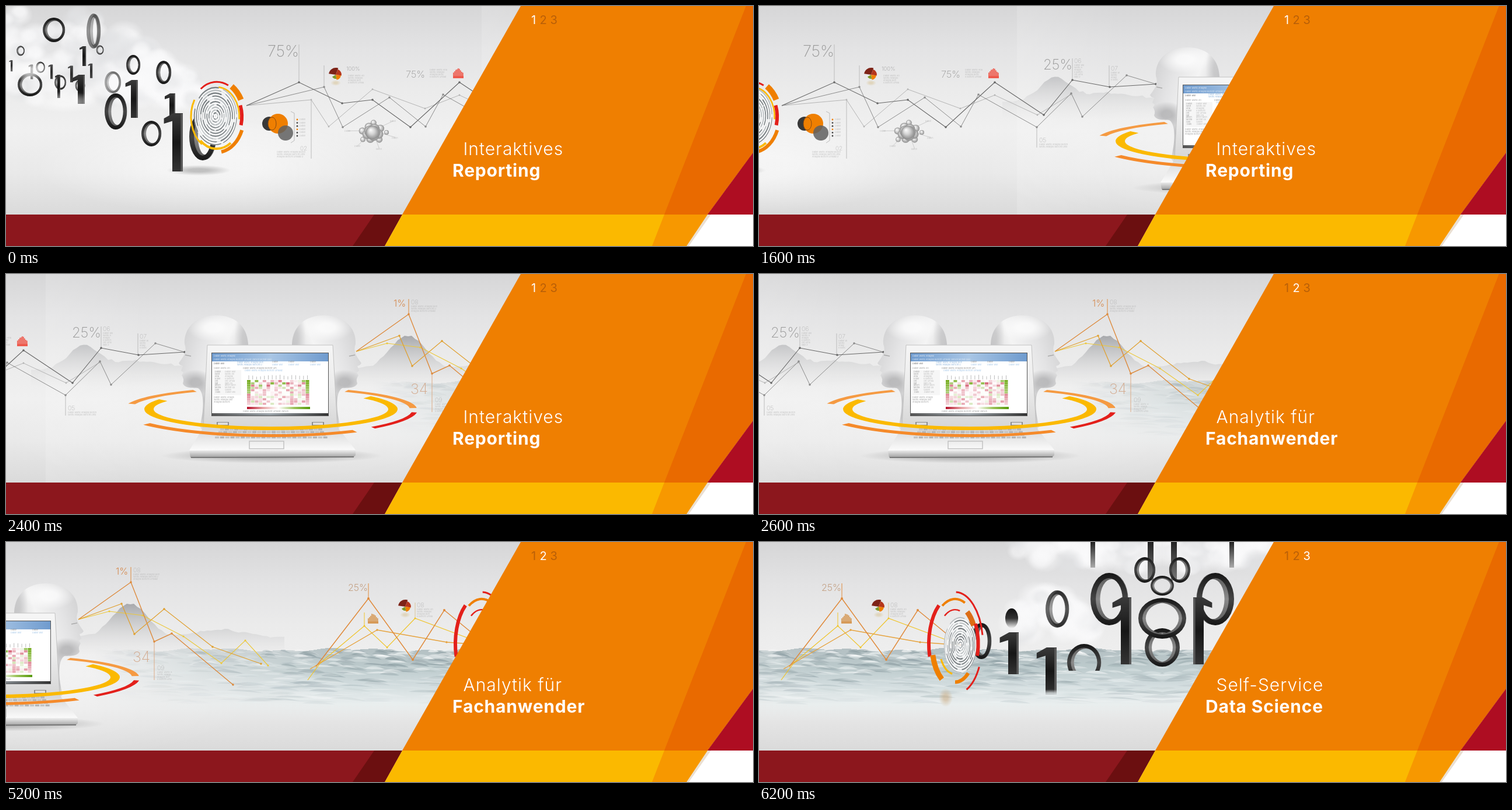
Animation, 1280 px wide and 412 px high, one loop 8200 ms. Source, as an HTML page with a canvas:

```html
<!DOCTYPE html>
<html lang="de">
<head>
<meta charset="utf-8">
<style>
html, body { margin: 0; width: 100%; height: 100%; overflow: hidden; background: #fff; }
canvas, svg { position: absolute; left: 0; top: 0; }
text { font-family: Inter, Lato, sans-serif; fill: #fff; }
.thin { font-size: 30px; font-weight: 300; letter-spacing: 1px; }
.bold { font-size: 30px; font-weight: 700; letter-spacing: .8px; }
.num { font-size: 20px; }
</style>
</head>
<body>
<canvas id="stage" width="1280" height="358"></canvas>
<svg width="1280" height="412">
  <path fill="#8c171d" d="M0 358H679L649 412H0Z"/>
  <path fill="#6b0f10" d="M631 358H679L649 412H594Z"/>
  <path fill="#ef7f01" d="M882 0H1280V252L1202 358H679Z"/>
  <path fill="#e96a00" d="M1268 0H1280V252L1202 358H1128Z"/>
  <path fill="#ae0d22" d="M1280 252V358H1202Z"/>
  <path fill="#eadfd2" d="M1202 358H1208L1170 412H1166Z"/>
  <path fill="#fbb900" d="M679 358H1202L1166 412H649Z"/>
  <path fill="#f79800" d="M1128 358H1202L1166 412H1107Z"/>
  <text class="num" x="900" y="31">1</text>
  <text class="num" x="914.5" y="31">2</text>
  <text class="num" x="932.5" y="31">3</text>
  <text class="thin" id="line1" x="783.5" y="256"></text>
  <text class="bold" id="line2" x="765" y="293"></text>
</svg>
<script>
const WIDTH = 2582, H = 358, MIRROR = 2393;
const world = document.createElement('canvas');
world.width = WIDTH; world.height = H;
const g = world.getContext('2d');
const ORANGE = '#ef7f01', YELLOW = '#fbb900', RED = '#e3201b', PALE = '#b4b4b4';

let seed = 7;
const rnd = () => (seed = seed * 16807 % 2147483647) / 2147483647;
const range = (a, b) => a + (b - a) * rnd();
const times = (n, fn) => { for (let i = 0; i < n; i++) fn(i); };
const bump = (x, mid, w) => Math.exp(-(((x - mid) / w) ** 2));

function at(x, y, sx, sy, draw) {
  g.save(); g.translate(x, y); g.scale(sx, sy); draw(); g.restore();
}
function grad(x0, y0, x1, y1, ...stops) {
  const l = g.createLinearGradient(x0, y0, x1, y1);
  stops.forEach((c, i) => l.addColorStop(i / (stops.length - 1), c));
  return l;
}
const down = (y0, y1, ...stops) => grad(0, y0, 0, y1, ...stops);
function rect(x, y, w, h, fill) { g.fillStyle = fill; g.fillRect(x, y, w, h); }
function poly(points, fill) {
  g.beginPath();
  points.forEach(p => g.lineTo(...p));
  g.fillStyle = fill; g.fill();
}
function line(points, color, w = 1, dots = 0) {
  g.beginPath();
  points.forEach(p => g.lineTo(...p));
  g.strokeStyle = color; g.lineWidth = w; g.stroke();
  if (dots) points.slice(1).forEach(p => disc(...p, dots, color));
}
function disc(x, y, r, fill) {
  g.beginPath(); g.arc(x, y, r, 0, 7); g.fillStyle = fill; g.fill();
}
function arc(x, y, rx, ry, from, to, w, color) {
  g.beginPath();
  g.ellipse(x, y, rx, ry, 0, from * Math.PI / 180, to * Math.PI / 180);
  g.strokeStyle = color; g.lineWidth = w; g.stroke();
}
// Elliptic band, dx wide at its sides and dy high at top and bottom
function band(x, y, rx, ry, dx, dy, from, to, fill) {
  const a = from * Math.PI / 180, b = to * Math.PI / 180;
  g.beginPath();
  g.ellipse(x, y, rx, ry, 0, a, b);
  g.ellipse(x, y, rx - dx, ry - dy, 0, b, a, true);
  g.fillStyle = fill; g.fill();
}
function soft(x, y, rx, ry, rgb, a, core = .3) {
  at(x, y, rx, ry, () => {
    const f = g.createRadialGradient(0, 0, 0, 0, 0, 1);
    f.addColorStop(core, `rgba(${rgb},${a})`);
    f.addColorStop(1, `rgba(${rgb},0)`);
    disc(0, 0, 1, f);
  });
}
function clouds(n, x0, x1, top, bottom) {
  times(n, () => {
    const x = range(x0, x1), t = top(x), r = range(12, 30);
    const y = t + r * .7 + Math.max(0, bottom - t - r) * rnd();
    soft(x, y, r * 1.2, r, rnd() < .25 ? '226,227,229' : '250,250,251', .55, .5);
  });
}
function label(s, x, y, size, color = '#999', weight = 200) {
  g.font = `${weight} ${size}px Inter, sans-serif`;
  g.fillStyle = color; g.fillText(s, x, y);
}
function tiny(x, y, rows, chars, color = PALE) {
  const words = 'Daten Werte Analyse Bericht Umsatz Zahlen Monat Quelle ';
  times(rows, i => label(words.repeat(2).substr(i * 6, chars - i % 3), x, y + i * 3.9, 3.8, color, 300));
}
function note(s, x, y, rows, chars) {
  label(s, x, y, 10.5, PALE);
  tiny(x, y + 5, rows, chars);
}
const upright = (x, y0, y1, color = '#bbb') => line([[x, y0], [x, y1]], color);

function zero(x, y, rx, ry, a = 1) {
  const w = ry * .27;
  g.globalAlpha = a;
  band(x + w * .35, y, rx - w * .3, ry - 1, w * .7, w * .8, 0, 360, down(y - ry, y + ry, '#555', '#8a8a8a', '#555'));
  band(x, y, rx, ry, w * .75, w * .75, 0, 360, down(y - ry, y + ry, '#161616', '#454545', '#161616'));
  g.globalAlpha = 1;
}
function one(x, y, h, w = h * .18, a = 1) {
  g.globalAlpha = a;
  poly([[x + w, y], [x + w, y + h], [x, y + h], [x, y + w * .75], [x - w * .8, y + w],
    [x - w * .8, y + w * .5], [x + w * .1, y]], down(y, y + h, '#3a3a3a', '#161616', '#333'));
  rect(x + w * .8, y + 1, w * .2, h - 1, '#5a5a5a');
  g.globalAlpha = 1;
}
function target(x, y, rx, ry) {
  at(x, y, rx, ry, () => {
    disc(0, 0, 1, 'rgba(232,234,235,.9)');
    times(10, i => {
      const r = .98 - i * .097, start = range(0, 90);
      arc(0, 0, r - .045, r - .045, 0, 360, .035, '#fff');
      times(5, k => arc(0, 0, r, r, start + k * 72, start + k * 72 + range(45, 70),
        range(.025, .055), rnd() < .6 ? '#7d8386' : '#bcc1c3'));
    });
  });
}
// Segments: scale, start, end, weight, colour
const hud = (x, y, rx, ry, parts) =>
  parts.forEach(([k, from, to, w, c]) => arc(x, y, rx * k, ry * k, from, to, w, c));

function pie(x, y) {
  const slice = (a, b, r, c) => {
    g.beginPath(); g.moveTo(x, y); g.arc(x, y, r, a, b); g.fillStyle = c; g.fill();
  };
  soft(x, y + 14, 9, 5, '220,205,170', .7);
  slice(-3, -1.2, 12, '#7d2317');
  slice(-1.2, .15, 10, '#b5361c');
  slice(.15, 1.4, 9, ORANGE);
  slice(1.4, 2.6, 7, '#7d9a2a');
}
function bars(x, y, h, color) {
  times(9, i => {
    const v = .4 + .55 * bump(i, 4, 3) * range(.7, 1);
    rect(x + i * 2, y - h * v, 1.6, h * v, color);
  });
  rect(x, y - h * .2, 18, h * .2, color);
}
function ridge(x0, x1, height, alpha) {
  const pts = [[x1, 200], [x0, 200]];
  for (let x = x0; x <= x1; x += 6) pts.push([x, 165 - height(x) - range(0, 4)]);
  poly(pts, down(100, 195, `rgba(135,137,142,${alpha})`, 'rgba(215,215,215,0)'));
}

function backdrop() {
  rect(0, 0, WIDTH, H, down(0, H, '#d6d6d7', '#e3e3e4', '#ebebeb', '#f0f0f0', '#e9e9e9', '#dadada'));
  soft(350, 275, 300, 80, '255,255,255', .5);
  soft(1200, 270, 460, 110, '255,255,255', .25);
  rect(815, 0, 180, H, grad(815, 0, 995, 0, 'rgba(255,255,255,.15)', 'rgba(255,255,255,0)'));
}

function digits() {
  clouds(150, -20, 330, x => Math.max(0, (x - 160) * .7), 165);
  times(10, i => {
    const x = 8 + i * 17, y = range(72, 138), r = range(6, 13);
    i % 2 ? zero(x, y, r * .8, r, .8) : one(x, y, r * 2.4, r * .4, .9);
  });
  zero(82, 41, 19, 21); zero(150, 43, 12, 30, .55);
  zero(41, 135, 21, 20); zero(183, 131, 14, 19, .45);
  zero(218, 101, 12, 17); zero(270, 114, 13, 20);
  zero(188, 181, 19, 31); zero(249, 219, 17, 22);
  one(131, 69, 34); one(88, 118, 40, 5); one(123, 118, 50, 12);
  one(214, 127, 65); one(280, 150, 40, 10);
  soft(40, 112, 36, 18, '255,255,255', .7);
  soft(100, 165, 60, 18, '255,255,255', .5);
  soft(330, 282, 55, 9, '130,130,130', .45);
  zero(337, 224, 23, 41);
  one(285, 184, 100);

  target(359, 189, 37, 50);
  hud(361, 190, 44, 58, [[1, 125, 210, 3, YELLOW], [1.03, 233, 296, 3, RED], [1.07, 303, 332, 10, ORANGE],
    [.98, -20, 15, 6, RED], [1.06, 22, 80, 6, ORANGE], [.95, 55, 132, 4, YELLOW], [.88, -85, 5, 2.5, YELLOW]]);
}

function reports() {
  ridge(790, 1070, x => 40 * bump(x, 880, 35) + 14 * bump(x, 975, 70), .6);
  upright(502, 66, 131); upright(545, 102, 139); upright(523, 161, 262);
  upright(849, 208, 243); upright(910, 90, 127); upright(973, 102, 139);
  const mouth = [1053, 134], start = [412, 171];
  line([start, [523, 161], [553, 207], [628, 143], [718, 176], [777, 153], [850, 187], [907, 152]], '#b5b5b5', 1, 1.4);
  line([start, [545, 139], [577, 208], [657, 157], [719, 207], [749, 152], [849, 208],
    [908, 150], [927, 190], [1003, 119], mouth], '#8c8c8c', 1, 1.8);
  line([start, [502, 131], [576, 167], [628, 161], [693, 208], [777, 131], [861, 187],
    [910, 127], [974, 139], mouth], '#666', 1.1, 1.8);

  label('75%', 448, 87, 27);
  label('100%', 583, 111, 9.5);
  pie(565, 118);
  tiny(586, 121, 4, 14);
  label('75%', 685, 123, 16.5);
  tiny(726, 111, 4, 15);
  bars(766, 124, 20, '#ee5a4d');

  disc(451, 202, 12, '#383838');
  disc(466, 202, 17, ORANGE);
  disc(479, 218, 13, 'rgba(95,95,95,.85)');
  arc(456, 202, 7, 11, 0, 360, 1, '#8a4a10');
  line([[488, 181], [494, 184], [494, 231], [488, 235]], '#bbb');
  times(6, i => {
    disc(499, 195 + i * 5.6, 1.4, i % 3 ? '#444' : ORANGE);
    tiny(503, 196 + i * 5.6, 1, 6);
  });
  label('02', 504, 248, 10, PALE);
  tiny(464, 252, 3, 26);

  times(5, i => {
    const a = -.55 + i * .92, x = 628 + 42 * Math.cos(a), y = 214 + 32 * Math.sin(a);
    line([[628, 214], [x, y]], '#c4c4c4', .8);
    tiny(x - 6, y + 2, 1, 6);
  });
  times(16, i => {
    const a = i * 2.4, d = 24 - i * 1.6, r = 4 + i * .5;
    const x = 628 + d * Math.cos(a), y = 217 + d * .8 * Math.sin(a);
    const f = g.createRadialGradient(x - r * .3, y - r * .4, 0, x, y, r);
    f.addColorStop(0, '#fff'); f.addColorStop(.5, '#d2d2d2'); f.addColorStop(1, '#8e8e8e');
    disc(x, y, r, f);
  });
  label('25%', 860, 109, 24);
  note('06', 913, 98, 6, 8);
  note('07', 976, 111, 4, 7);
  note('05', 853, 234, 2, 26);
}

function head() {
  const shape = new Path2D(`M322 270V120C320 88 298 71 267 71C232 71 211 94 213 120C217 132 214 138 203 153
    Q205 157 210 158L207 166L211 169L208 174Q213 180 210 188C214 197 228 195 236 196C248 203 246 235 239 262L245 270Z`);
  g.save(); g.clip(shape);
  rect(200, 70, 125, 205, grad(205, 100, 322, 140, '#cfcfd0', '#e4e4e5', '#f4f4f4', '#d6d6d7'));
  soft(262, 92, 45, 24, '255,255,255', .75);
  soft(232, 186, 30, 22, '150,150,152', .55);
  soft(245, 232, 14, 50, '150,150,152', .5);
  soft(318, 110, 20, 50, '165,165,167', .4);
  line([[214, 139], [224, 141]], '#aaa', 1.5);
  g.restore();
}

function screen() {
  rect(260, 136, 199, 107, '#fff');
  rect(260, 136, 199, 14, grad(260, 0, 459, 0, '#6f9bce', '#a9c6e5', '#6f9bce'));
  tiny(263, 142, 1, 20, '#fff');
  tiny(263, 148, 1, 52, '#e8f1fa');
  tiny(263, 155, 1, 9, '#444');
  tiny(303, 153, 2, 24, '#6f9fd0');
  [363, 391, 428].forEach(x => { tiny(x, 152, 1, 6, '#777'); tiny(x, 157, 1, 9, '#8ab6e0'); });
  tiny(263, 163, 1, 14, '#888');
  rect(263, 165, 47, 43, '#f6f6f6');
  tiny(265, 169, 10, 5, '#888');
  tiny(282, 169, 10, 9, '#aaa');
  tiny(263, 213, 3, 18, '#888');
  tiny(313, 163, 1, 30, '#777');
  tiny(316, 167, 1, 34, '#8ab6e0');
  times(16, c => {
    const x = 320 + c * 6.7, edge = c < 1 || c > 14;
    upright(x + 3, range(173, 177), 181, '#bbb');
    times(11, r => {
      const a = edge ? .9 - r * .07 : rnd() ** 2 * (r < 3 ? .9 : .4);
      const green = edge ? r < 6 : rnd() < .3;
      rect(x, 182 + r * 3.9, 6, 3.7, green ? `rgba(105,165,10,${a})` : `rgba(190,15,45,${a})`);
    });
  });
  rect(320, 228, 108, 4, grad(320, 0, 428, 0, '#b5122b', '#e7a5a5', '#fff', '#9cc35a', '#579a0a'));
  tiny(313, 237, 1, 42, '#888');
  rect(260, 239, 199, 4, grad(260, 0, 459, 0, '#555', '#98a0a6', '#333'));
}

function laptop() {
  soft(362, 312, 190, 13, '120,120,120', .5);
  const loop = (rx, ry, dx, dy, from, to, c) => band(361, 232, rx, ry, dx, dy, from, to, c);
  loop(252, 39, 12, 4, 194, 238, '#f59a42');
  loop(250, 39, 12, 4, -58, -3, '#f59a42');
  head();
  at(719, 0, -1, 1, head);
  poly([[252, 122], [467, 122], [475, 264], [245, 264]], down(122, 264, '#f6f6f6', '#ececec', '#d6d6d6'));
  line([[245, 264], [252, 122], [467, 122], [475, 264]], '#c2c2c2');
  rect(259, 135, 201, 109, '#555');
  screen();
  poly([[246, 262], [474, 262], [506, 302], [221, 303]], down(262, 303, '#d4d4d4', '#fbfbfb'));
  poly([[221, 303], [506, 302], [506, 311], [503, 314], [223, 315]], down(302, 315, '#f0f0f0', '#a0a0a0'));
  line([[224, 315], [503, 314]], '#666', 1.5);
  [268, 431].forEach(x => { rect(x, 254, 21, 8, '#8d8d8d'); rect(x + 2, 255, 17, 4, '#ddd'); });
  times(4, r => times(22, k =>
    rect(274 - r * 3 + k * (8 + r * .28), 265 + r * 4.6, 7, 3.4, k % 2 ? '#b4b4b4' : '#c4c4c4')));
  g.strokeStyle = '#c2c2c2'; g.strokeRect(324, 287, 59, 13);
  loop(217, 36, 16, 6, -38, 208, YELLOW);
  loop(264, 48, 14, 5, 56, 146, '#f58a2a');
  loop(252, 47, 9, 4, 7, 45, RED);
}

function sea() {
  ridge(1340, 1700, x => 58 * bump(x, 1436, 42) + 14 * bump(x, 1590, 50), .75);
  const depth = x => Math.min(1, Math.max(0, (x - 1370) / 420));
  const water = down(183, 310, '#b4c0c3', '#bccacc', '#d3dddf', '#e9eeee', 'rgba(232,234,234,0)');
  for (let x = 1370; x < WIDTH; x += 2) {
    g.globalAlpha = depth(x);
    rect(x, Math.round(185 + 2 * Math.sin(x / 37) + 1.5 * Math.sin(x / 13)), 2, 125, water);
  }
  times(800, i => {
    const far = rnd() ** 1.5, y = 187 + 90 * far;
    const x = range(1380, WIDTH), w = range(15, 35) + 40 * far, k = range(3, 9);
    g.globalAlpha = depth(x) * range(.2, .7) * (1 - far * .75);
    g.beginPath(); g.moveTo(x, y);
    g.quadraticCurveTo(x + w * .4, y - k, x + w, y + range(-1, 5));
    g.quadraticCurveTo(x + w * .5, y + k * .3, x, y);
    g.fillStyle = ['#fff', '#edf2f2', '#82949a', '#9aa9ad'][i % 4]; g.fill();
  });
  g.globalAlpha = 1;
}

function forecast() {
  const orange = '#dd8a3c', gold = '#ecc83a', mouth = [1347, 133];
  upright(1437, 43, 69, orange);
  upright(1477, 171, 237, '#dcab87');
  line([mouth, [1400, 119], [1457, 126], [1527, 162], [1592, 208], [1633, 169], [1672, 212]], gold, 1.2, 1.6);
  line([mouth, [1437, 69], [1477, 171], [1507, 157], [1612, 245]], orange, 1.4, 1.8);
  line([mouth, [1421, 106], [1443, 158], [1494, 115], [1577, 180], [1660, 209]], '#e0a030', 1.3, 1.8);
  label('1%', 1411, 56, 16, '#d58b50', 300);
  note('08', 1441, 52, 3, 24);
  label('34', 1440, 206, 25, '#d3ab90');
  note('09', 1482, 220, 4, 13);
}

function science() {
  clouds(45, 440, 575, x => 120 - 68 * bump(x, 490, 45), 165);
  clouds(50, 440, 690, () => -25, 48);
  const orange = '#e08a3a', gold = '#f0c428', hub = [345, 177];
  upright(142, 71, 97, orange);
  upright(135, 121, 144, gold);
  upright(222, 104, 131, '#d8c49a');
  line([[38, 237], [60, 207], [135, 144], [174, 181], [222, 131], hub], gold, 1.2, 1.5);
  line([[42, 218], [157, 151], [276, 172], hub], '#e6a23c', 1.3, 1.7);
  line([[52, 214], [142, 97], [218, 202], [272, 117], hub], orange, 1.5, 2);
  label('25%', 107, 84, 16, '#c4a286', 300);
  bars(141, 140, 19, '#d69a58');
  pie(205, 111);
  note('08', 225, 112, 4, 14);

  zero(381, 170, 17, 31);
  target(...hub, 28, 48);
  hud(336, 175, 45, 84, [[1, 165, 232, 6, RED], [1.06, 272, 350, 3, RED], [.92, 238, 294, 4, ORANGE],
    [.88, 125, 165, 9, ORANGE], [.8, 305, 332, 9, '#dc6d16'], [.88, -28, 16, 6, RED], [1.03, 27, 65, 3, RED],
    [.78, 50, 90, 6, ORANGE], [.62, 100, 150, 3, YELLOW], [.7, 235, 285, 2.5, RED]]);
  soft(320, 267, 12, 16, '200,165,120', .5);

  at(433, 131, 11, 17, () => disc(0, 0, 1, down(-1, 1, '#111', '#333', '#f2f2f2')));
  one(427, 155, 72, 18);
  zero(511, 115, 20, 32, .8);
  one(491, 181, 81, 19);
  g.save(); g.beginPath(); g.rect(520, 160, 80, 61); g.clip();
  zero(557, 207, 29, 32); g.restore();
  soft(500, 262, 36, 9, '228,235,236', .8);
  rect(568, 0, 8, 44, down(0, 44, '#222', '#aaa'));
  rect(666, 0, 10, 66, down(0, 66, '#222', '#777'));
  zero(661, 48, 18, 22);
  zero(600, 98, 32, 45);
  one(620, 95, 115, 18);
  zero(691, 75, 20, 17);
  zero(691, 181, 30, 33);
  zero(691, 131, 41, 35);
}

function reflect() {
  const w = WIDTH - MIRROR, x = MIRROR - w;
  at(2 * MIRROR, 0, -1, 1, () => g.drawImage(world, x, 0, w, H, x, 0, w, H));
}

backdrop(); digits(); reports(); sea();
at(840, 0, 1, 1, laptop);
forecast();
at(1702, 0, 1, 1, science);
reflect();

const stage = document.getElementById('stage').getContext('2d');
const nums = document.querySelectorAll('.num');
const line1 = document.getElementById('line1'), line2 = document.getElementById('line2');
const titles = [['Interaktives', 'Reporting'], ['Analytik für', 'Fachanwender'], ['Self-Service', 'Data Science']];

// Two pans of nine jumps each, one jump every 200 ms
const pan = (t, start) => Math.min(9, Math.max(0, Math.floor((t - start) / 200) + 1)) / 9;

function frame(now) {
  const t = now % 8200;
  const shift = Math.round(840 * pan(t, 1000) + 862 * pan(t, 4600));
  const page = t < 2600 ? 0 : t < 6200 ? 1 : 2;
  stage.drawImage(world, -shift, 0);
  [line1.textContent, line2.textContent] = titles[page];
  nums.forEach((n, i) => n.style.fill = i === page ? '#fff' : '#b85f08');
  requestAnimationFrame(frame);
}
frame(performance.now());
</script>
</body>
</html>
```
